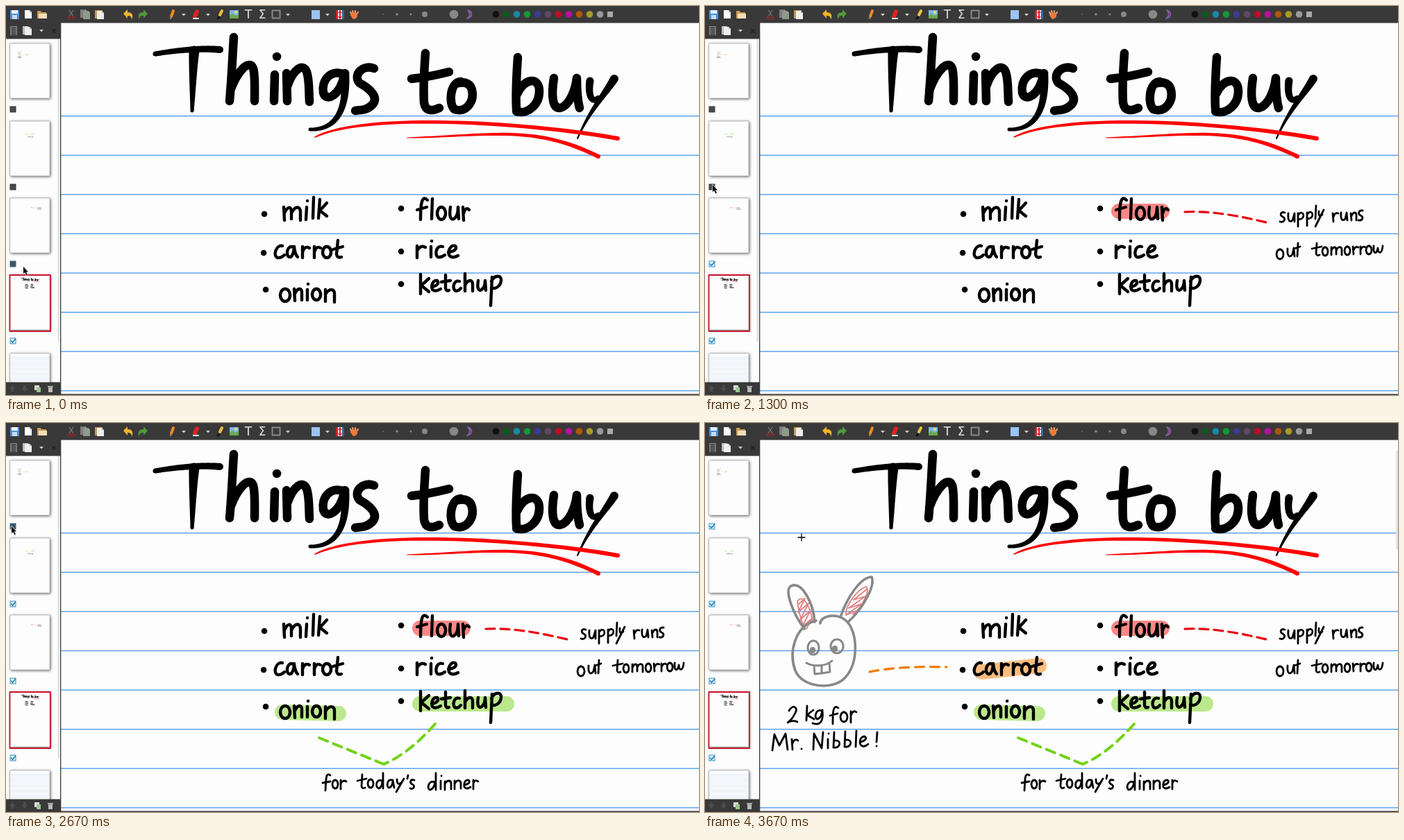
Write an HTML page with a canvas that moves like this. It is 998x561 px and loops after 3.71 s.

```html
<!DOCTYPE html>
<html lang="en">
<head>
<meta charset="utf-8">
<title>Things to buy</title>
<style>
  html, body { margin: 0; width: 100%; height: 100%; overflow: hidden; background: #fdfdfd; }
  canvas { display: block; }
</style>
</head>
<body>
<canvas id="stage" width="998" height="561" aria-label="Shopping list in a note-taking app"></canvas>
<script>
const ctx = document.getElementById('stage').getContext('2d');
const LOOP = 3710;
let boost = 1; // thickens ink in the small previews

function ink(d, width, color = '#000', dash = []) {
  ctx.strokeStyle = color;
  ctx.lineWidth = width * boost;
  ctx.lineCap = ctx.lineJoin = 'round';
  ctx.setLineDash(dash);
  ctx.stroke(new Path2D(d));
  ctx.setLineDash([]);
}
function shape(d, color) {
  ctx.fillStyle = color;
  ctx.fill(new Path2D(d));
}
function box(x, y, w, h, color) {
  ctx.fillStyle = color;
  ctx.fillRect(x, y, w, h);
}
function disc(x, y, r, color) {
  ctx.fillStyle = color;
  ctx.beginPath();
  ctx.arc(x, y, r, 0, 7);
  ctx.fill();
}
// Cubic stroke whose width runs from w0 to w1, changing fastest at the start
function brush([x0, y0, x1, y1, x2, y2, x3, y3], w0, w1, color = '#000', power = 1) {
  const at = (a, b, c, d, t) =>
    a * (1 - t) ** 3 + 3 * b * t * (1 - t) ** 2 + 3 * c * t * t * (1 - t) + d * t ** 3;
  const left = [], right = [], n = 40;
  for (let i = 0; i <= n; i++) {
    const t = i / n, e = .001;
    const x = at(x0, x1, x2, x3, t), y = at(y0, y1, y2, y3, t);
    const dx = at(x0, x1, x2, x3, t + e) - x, dy = at(y0, y1, y2, y3, t + e) - y;
    const k = (w0 + (w1 - w0) * t ** power) / 2 / Math.hypot(dx, dy);
    left.push([x - dy * k, y + dx * k]);
    right.unshift([x + dy * k, y - dx * k]);
  }
  shape('M' + left.concat(right).join('L') + 'Z', color);
  disc(x0, y0, w0 / 2, color);
  disc(x3, y3, w1 / 2, color);
}
function marker(d, color) {
  ctx.globalCompositeOperation = 'multiply';
  ink(d, 22, color);
  ctx.globalCompositeOperation = 'source-over';
}

const title = [
  'M328 45C326 75 325 105 322 137M323 122C334 92 351 76 356 90C359 100 358 122 358 137',
  'M387 99L386 137M390 73h.1',
  'M404 97L405 137M405 116C414 90 428 82 433 95C437 106 436 122 437 138',
  'M487 99C467 90 454 108 457 125C461 139 480 130 487 101',
  'M530 90C514 84 499 99 509 111C524 119 537 131 528 142C519 151 510 150 503 151',
  'M604 68C602 95 601 122 602 139C604 152 613 152 624 147M584 105C605 103 622 99 638 95',
  'M655 109C639 110 637 142 646 149C662 155 675 138 671 121C669 112 661 109 653 111',
  'M737 74C735 103 734 130 735 148M736 127C746 104 767 102 768 121C769 143 750 157 735 152',
  'M789 104C785 130 787 148 798 147C811 144 820 122 822 104C822 122 823 136 826 147'
];
const words = [
  // milk
  'M400 290L401 309M401 299C405 289 411 288 411 297L411 307M411 299C416 288 424 288 424 297L424 309M433 290L432 308M434 281h.1M443 276L442 306M452 279L450 306M462 284L452 295L462 303',
  // carrot
  'M398 346C389 344 384 360 391 363Q396 364 401 359M414 348C405 343 402 360 408 362C413 363 415 352 415 347Q416 358 420 362M427 347L427 363M427 355Q430 345 437 349M444 347L444 363M444 355Q447 345 453 349M462 347a6 8 0 1 0 .1 0M478 338L476 358Q477 364 483 362M471 351L485 347',
  // onion
  'M402 408a7 9 0 1 0 .1 0M415 408L416 425M416 415C420 406 426 406 426 413L426 424M434 409L434 424M435 401h.1M447 408a6 8 0 1 0 .1 0M460 409L460 426M460 416C465 407 473 407 473 415L473 427',
  // flour
  'M607 280C599 272 597 284 597 308M592 294L606 290M614 278L613 307M627 290a6 9 0 1 0 .1 0M640 290C638 303 640 309 645 307C650 304 651 296 651 290L652 307M658 290L659 309M659 299Q662 289 667 294',
  // rice
  'M592 346L592 363M592 353Q597 344 604 348M612 347L612 362M613 339h.1M629 347C619 344 617 360 622 362Q627 363 632 359M637 355C646 354 650 350 647 346C641 344 636 352 638 359Q642 365 651 360',
  // ketchup
  'M597 387L597 415M609 393L598 403L609 412M613 405C621 404 624 399 621 396C615 395 612 402 614 409Q618 413 626 408M633 388L633 407Q634 412 638 410M627 398L640 396',
  'M653 397C644 394 642 409 648 411Q652 411 655 407M661 386L661 411M661 403C665 394 672 394 672 401L672 411M680 396C678 408 681 412 685 409C689 406 690 400 690 396L691 410M700 391L698 432M699 397C704 387 714 388 713 396C712 405 704 409 699 406'
];
const supplyNote = [
  // supply runs
  'M835 298C829 296 827 302 832 304C837 307 834 313 828 311M840 299C839 309 842 313 846 309L849 299L849 311M854 299L854 318M854 302C858 295 864 299 861 305Q858 309 854 307M867 298L867 317M867 301C871 294 877 298 874 304Q871 308 867 306M880 288L879 307M884 296Q883 306 889 301M891 294L879 318',
  'M904 299L905 311M905 304Q907 297 912 299M916 298C915 308 918 311 922 307L924 298L925 309M930 299L931 309M931 303C934 296 938 297 938 302L938 309M947 295C941 294 940 300 944 302C949 304 947 310 941 309',
  // out tomorrow
  'M828 351a5 7 0 1 0 .1 0M839 350C838 361 842 364 846 358L848 349L849 361M854 342L853 361M848 350L857 347M881 342L880 357Q881 361 885 359M874 350L888 347M893 348a4 6 0 1 0 .1 0M902 348L902 359M902 353C905 346 909 347 909 352L909 358M909 353C912 345 917 347 917 352L917 359',
  'M925 347a4 6 0 1 0 .1 0M933 347L934 358M934 352Q936 346 941 348M944 347L944 358M944 352Q947 345 951 348M956 346a4 6 0 1 0 .1 0M963 346C962 358 967 359 969 349C969 358 975 358 976 346'
];
const dinnerNote = [
  // for today's
  'M467 508C460 503 461 515 460 530M456 519L467 517M474 515a4 6 0 1 0 .1 0M482 515L482 528M482 520Q485 514 490 517M513 507L512 524Q513 528 517 526M506 516L519 513M525 514a4 6 0 1 0 .1 0M541 516C533 512 531 526 537 527Q542 525 542 515M543 505L543 527',
  'M556 515C549 512 547 526 552 526Q557 524 557 515L559 526M563 514Q563 524 570 518M573 513L562 532M579 508L578 513M588 515C582 513 581 519 585 521C590 523 587 529 582 527',
  // dinner
  'M617 518C609 514 605 528 611 529Q617 527 618 517M619 505L619 529M626 516L626 528M627 509h.1M632 517L632 529M632 521C635 514 641 515 641 520L641 528M646 516L646 528M646 521C649 513 655 515 655 520L655 527M660 522C667 521 669 517 666 515C661 514 659 520 660 525Q663 529 669 525M673 515L673 528M673 520Q675 513 680 517'
];
const rabbitNote = [
  // 2 kg for
  'M121 415C126 405 135 410 130 418Q126 427 119 432Q126 428 133 431M147 408L146 429M156 414L147 421L157 427M168 415C160 411 156 426 162 427Q168 425 169 414C171 430 166 437 155 433M192 411C184 405 184 418 184 434M180 422L191 419M200 417a5 7 0 1 0 .1 0M210 416L210 432M210 422Q213 413 218 417',
  // Mr. Nibble !
  'M97 472L100 449L107 465L116 448L119 471M125 456L126 471M126 462Q129 454 134 458M139 470h.1M156 471L157 448L168 469L170 446M177 456L177 469M178 448h.1M186 446L185 468C195 470 198 456 186 458',
  'M202 445L201 467C211 469 214 455 202 457M218 444L217 467M223 460C231 459 234 454 230 452C224 452 222 459 224 464Q228 469 235 463M248 446L247 460M247 466h.1'
];

function drawBase() {
  title.forEach(d => ink(d, 12.5));
  brush([215, 69, 240, 65, 276, 60, 308, 63], 7, 10);
  brush([271, 65, 269, 90, 269, 125, 268, 151], 15, 5);
  brush([488, 97, 491, 135, 484, 179, 438, 178], 12.5, 5);
  brush([841, 108, 838, 128, 843, 141, 853, 133], 11, 8);
  brush([876, 105, 862, 128, 841, 150, 823, 191], 12, 2);
  brush([445, 189, 520, 152, 760, 169, 881, 191], 1.5, 6, '#f00', .4);
  brush([578, 190, 700, 187, 760, 171, 853, 217], 1, 6, '#f00', .6);
  words.forEach(d => ink(d, 4.4));
  ink('M372 300h.1M371 356h.1M374 409h.1M569 292h.1M569 354h.1M569 401h.1', 8.5);
}
function drawFlour() {
  marker('M596 296L658 296', '#ff8888');
  ink('M691 297C730 295 770 303 808 312', 3.2, '#e8000c', [13, 8]);
  supplyNote.forEach(d => ink(d, 2.8));
}
function drawDinner() {
  marker('M398 417L479 419', '#bdea8d');
  marker('M596 405L721 405', '#bdea8d');
  ink('M451 454L544 492', 4, '#73d216', [13, 9]);
  ink('M618 434Q580 477 544 492', 4, '#73d216', [13, 9]);
  dinnerNote.forEach(d => ink(d, 2.8));
}
function drawRabbit() {
  marker('M398 359L481 350', '#fdbf80');
  ink('M237 359C270 352 310 351 348 352', 3.2, '#f57900', [13, 9]);
  const hatch = '#e08080', gray = '#888';
  ink('M134 262L144 253L134 273L149 260L137 284L152 270L140 294L154 282L146 297M133 257C136 278 140 290 144 296M134 256C142 246 153 268 155 288', 1.8, hatch);
  ink('M234 239L214 255L231 250L207 267L225 261L203 277L218 271M203 277C202 262 220 240 232 236C238 240 228 264 213 276', 1.8, hatch);
  ink('M160 285C130 292 120 330 130 357C140 382 185 386 202 367C222 345 220 300 203 285C190 273 166 278 166 289', 3.6, gray);
  ink('M143 297C125 272 114 240 124 235C140 228 156 260 158 287M195 280C205 250 225 222 240 222C246 236 225 270 207 286', 3.6, gray);
  ink('M156 314a8 10 0 1 0 .1 0M190 312a9 10 0 1 0 .1 0M146 346C156 352 174 351 183 343M157 350L158 362L168 361L168 350M168 361L180 359L179 347', 3, gray);
  ink('M155 327v1M187 325v1', 8, gray);
  rabbitNote.forEach(d => ink(d, 2.8));
}

// Top to bottom in the sidebar, with the time each one is switched on
const layers = [
  { draw: drawRabbit, top: 54, on: 2710, hover: 2230 },
  { draw: drawDinner, top: 166, on: 1530, hover: 1400 },
  { draw: drawFlour, top: 277, on: 700, hover: 0 },
  { draw: drawBase, top: 388, on: 0 }
];

function drawPage(t) {
  box(79, 24, 919, 537, '#fdfdfd');
  for (let i = 0; i < 8; i++) box(79, 158 + i * 56.6, 919, 1.3, '#4a98ec');
  for (const layer of [...layers].reverse()) if (t >= layer.on) layer.draw();
  box(79, 559.5, 919, 1.5, '#3a3a3a');
}

function sheet(y, h) {
  ctx.shadowColor = 'rgba(0,0,0,.7)';
  ctx.shadowBlur = 4;
  ctx.shadowOffsetX = ctx.shadowOffsetY = 1;
  box(6, y, 57, h, '#fdfdfd');
  ctx.shadowColor = 'transparent';
  ctx.strokeStyle = '#aaa';
  ctx.lineWidth = .7;
  ctx.strokeRect(6, y, 57, h);
}
function checkbox(y, checked, hover) {
  box(5.5, y - 4.5, 9, 9, checked ? '#2d8fc4' : hover ? '#2f6a90' : '#333');
  box(6.5, y - 3.5, 7, 7, checked ? '#e6f4fb' : hover ? '#405361' : '#4b4b4b');
  if (checked) ink(`M7.5 ${y}l2 2.3l4 -5`, 1.6, '#1f7fb4');
}
function drawSidebar(t) {
  box(0, 47, 78, 496, '#fdfdfd');
  for (const { draw, top, on, hover } of layers) {
    sheet(top, 79);
    ctx.save();
    ctx.translate(12.5, top + 2);
    ctx.scale(.04, .04);
    boost = on ? 1 : 2;
    draw();
    ctx.restore();
    boost = 1;
    checkbox(top + 95, t >= on, t >= hover);
  }
  ctx.strokeStyle = '#c8142c';
  ctx.lineWidth = 1.8;
  ctx.strokeRect(5.5, 388, 58.5, 81);
  sheet(501, 60);
  for (let y = 506; y < 542; y += 2.3) box(6.5, y, 56, .6, '#d4e2f2');
  if (t < 3500) box(74.5, 48, 2.5, 436, '#dedede');
  box(78, 24, 1.3, 537, '#3a3a3a');
}

function caret(x, y = 11) { shape(`M${x - 3} ${y}h6l-3 3.5z`, '#ccc'); }
function paper(x, y, color = '#eee') {
  shape(`M${x - 5} ${y - 6}h7l3 3v9h-10z`, color);
  shape(`M${x + 2} ${y - 6}v3h3z`, '#aaa');
}
function glyph(text, x) {
  ctx.font = '17px "DejaVu Sans", sans-serif';
  ctx.textAlign = 'center';
  ctx.fillStyle = '#e4e4e4';
  ctx.fillText(text, x, 18);
}
function drawBars() {
  box(0, 0, 998, 24.5, '#393939');
  box(0, 24, 78, 23.5, '#393939');
  box(0, 542.5, 78, 19, '#393939');

  box(6, 6, 13, 13, '#4a90d9'); box(8, 6, 9, 5, '#eef4fa'); box(9, 13, 7, 6, '#c8daea');
  paper(32, 12, '#fff');
  shape('M45 7h5l1 2h7v9h-13z', '#c99a55'); box(47, 11, 12, 7, '#f3dfb8');
  ink('M91 6L97 15M97 6L91 15', 1.3, '#777');
  ink('M91 15a2 2 0 1 0 .1 0M97 15a2 2 0 1 0 .1 0', 1.5, '#8a2c2c');
  paper(112, 11, '#7d7d7d'); paper(116, 13, '#8f9a8a');
  box(128, 6, 11, 12, '#c59a52'); paper(136, 13);
  shape('M169 11l6 -6v4c7 0 9 4 6 11c0 -5 -2 -6 -6 -6v4z', '#f0b429');
  shape('M204 11l-6 -6v4c-7 0 -9 4 -6 11c0 -5 2 -6 6 -6v4z', '#4f9a3d');
  ink('M241 7L238 15', 4, '#f08a24'); ink('M237 18h.1', 1.5, '#eee');
  ink('M275 8L272 15', 6, '#d22'); ink('M270 18h7', 2, '#eee');
  ink('M311 7L308 13', 4, '#f0c040'); ink('M307 16L305 18', 3, '#111');
  box(322, 6, 13, 12, '#79b7e8'); shape('M322 18v-4l4 -3l4 3l5 -2v6z', '#6aa84f'); disc(331, 9, 2, '#ffe14d');
  glyph('T', 349); glyph('Σ', 369);
  ctx.strokeStyle = '#8a8a8a'; ctx.lineWidth = 2; ctx.strokeRect(383.5, 6.5, 11, 11);
  [256, 291, 406, 463].forEach(x => caret(x));
  box(440, 6, 12, 13, '#9cc4f2');
  box(475, 6, 12, 13, '#dfe8f5'); box(475, 6, 3, 13, '#cc2233'); box(484, 6, 3, 13, '#3465a4');
  shape('M481 6l3 4h-6zM481 19l3 -4h-6z', '#d22'); box(480, 9, 2, 7, '#d22');
  ink('M498 12L496 9M500 11L499 7M503 11V7M505 12L507 9', 2.2, '#f0a070');
  shape('M495 12l3 1v-3h8v5q-2 4 -6 4z', '#f07a3c');
  [[543, .8], [563, 1.8], [583, 1.5], [603, 4], [645, 6.3]].forEach(([x, r]) => disc(x, 12, r, '#888'));
  ink('M665 6C672 8 673 16 664 18C669 14 669 10 665 6', 1.8, '#8a5aa8');
  ['#111', '#0b5a1c', '#148ba8', '#109a34', '#3a3c98', '#5e4868', '#c00c28', '#b810a4', '#b0560c', '#a89a28', '#999']
    .forEach((color, i) => disc(705.5 + i * 15, 12, 4.8, color));
  box(866, 8, 8, 8, '#aaa');

  box(6, 29, 10, 13, '#777');
  for (let y = 31; y < 41; y += 3) box(8, y, 6, 1.2, '#222');
  paper(29, 35, '#bbb'); paper(32, 36, '#eee'); caret(51, 34);
  ink('M67 34l4 4M71 34l-4 4', 1.2, '#161616');
  shape('M4 552l5 -5l5 5h-3v4h-4v-4zM22 551l5 5l5 -5h-3v-4h-4v4z', '#4c4c4c');
  box(41, 547, 7, 7, '#ddd'); box(44, 550, 6, 7, '#9cc78c');
  box(60, 548, 8, 1.5, '#ccc'); box(61, 550, 6, 7, '#bbb');
}

const path = [
  [0, 25, 376], [400, 8, 368], [850, 8, 368], [1300, 11, 258], [1400, 9, 260], [1680, 9, 260],
  [2070, 12, 142], [2220, 8, 149], [3200, 8, 149], [3600, 139, 165], [LOOP, 139, 165]
];
function drawCursor(t) {
  const i = path.findIndex(key => key[0] > t);
  const [t0, x0, y0] = path[i - 1], [t1, x1, y1] = path[i];
  const u = (t - t0) / (t1 - t0), k = u * u * (3 - 2 * u);
  const x = x0 + (x1 - x0) * k, y = y0 + (y1 - y0) * k;
  if (x > 79) {
    ink(`M${x - 5} ${y}h10M${x} ${y - 5}v10`, 1.3);
    box(995, 40, 3, 142, '#e2e2e2');
  } else {
    const arrow = `M${x} ${y}v10l2.2 -2l2 4.2l1.7 -.8l-2 -4h3z`;
    ink(arrow, 1.4, '#ddd');
    shape(arrow, '#111');
  }
}

function frame(now) {
  const t = now % LOOP;
  drawPage(t);
  drawSidebar(t);
  drawBars();
  drawCursor(t);
  requestAnimationFrame(frame);
}
requestAnimationFrame(frame);
</script>
</body>
</html>
```
